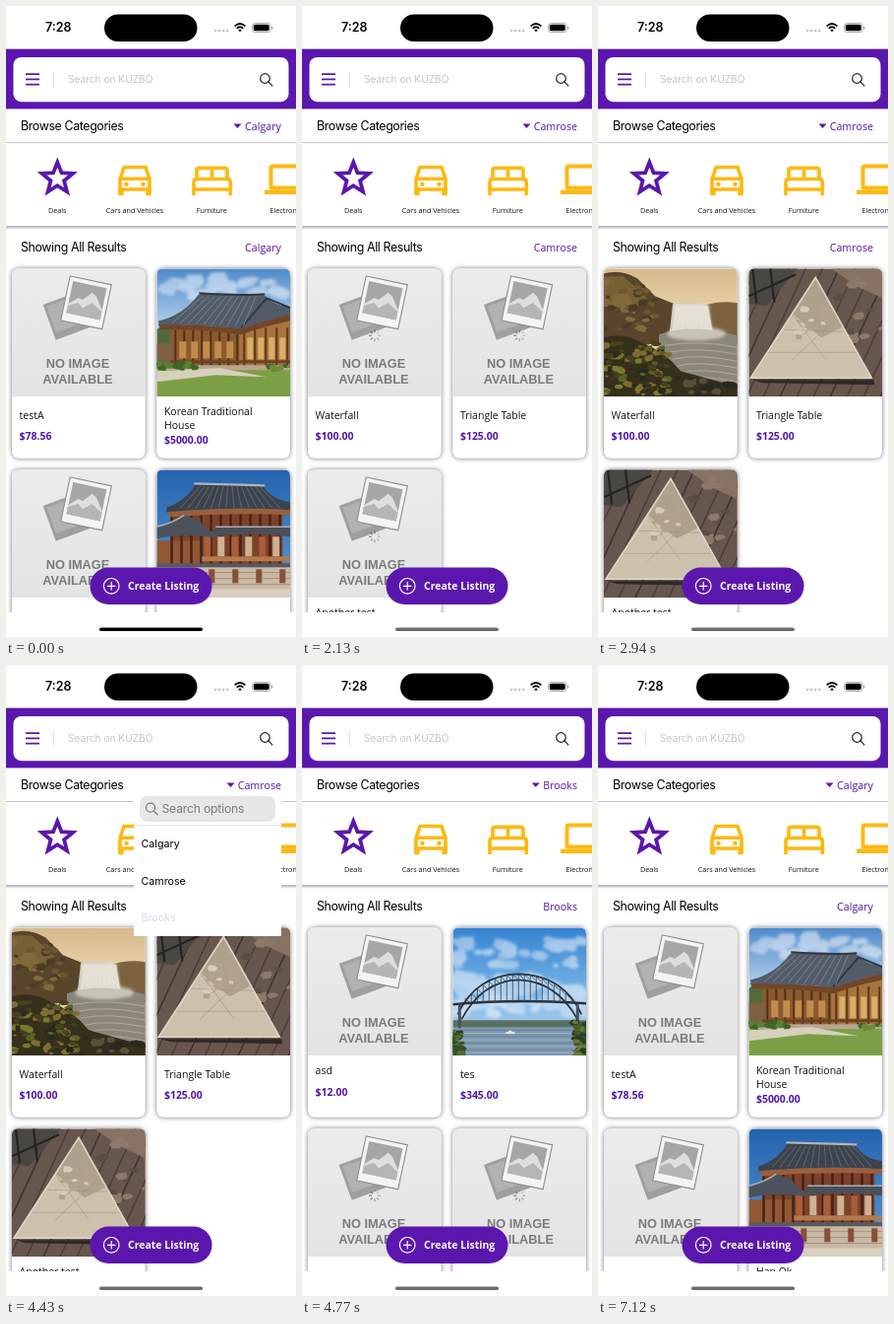
These frames come from a looping animation (295x640 px, 7.24 s). An HTML page:

```html
<!DOCTYPE html>
<html lang="en">
<head>
<meta charset="utf-8">
<title>Marketplace</title>
<style>
html, body { margin: 0; width: 100%; height: 100%; overflow: hidden; background: #fff; }
svg { display: block; }
text { font-family: "Open Sans", sans-serif; font-size: 10.5px; fill: #111; }
.ui { font-family: Inter, sans-serif; }
.head { font-size: 12.4px; letter-spacing: -.38px; fill: #000; }
.city { font-size: 10.7px; fill: #5216ac; text-anchor: end; }
.price { font-weight: 700; fill: #5216ac; }
.cat { font-size: 7.2px; text-anchor: middle; }
.opt { font-size: 10.7px; fill: #000; }
.none { font: bold 12.8px "Liberation Sans", sans-serif; fill: #7b7b7b; text-anchor: middle; }
.card { filter: drop-shadow(0 .5px 2.5px rgba(0,0,0,.55)); }
</style>
</head>
<body>
<script>
const LOOP = 7240, PURPLE = '#5b17ad', GOLD = '#fdb913';

const text = (x, y, s, cls = '', extra = '') => `<text x="${x}" y="${y}" class="${cls}" ${extra}>${s}</text>`;
const rect = (x, y, w, h, fill, r = 0, extra = '') =>
  `<rect x="${x}" y="${y}" width="${w}" height="${h}" rx="${r}" fill="${fill}" ${extra}/>`;
const shape = (d, fill, extra = '') => `<path d="${d}" fill="${fill}" ${extra}/>`;
const line = (d, color, w = 1, extra = '') =>
  `<path d="${d}" fill="none" stroke="${color}" stroke-width="${w}" ${extra}/>`;
const oval = (x, y, rx, ry, fill, extra = '') =>
  `<ellipse cx="${x}" cy="${y}" rx="${rx}" ry="${ry}" fill="${fill}" ${extra}/>`;
const fade = (id, ...stops) => `<linearGradient id="${id}" x2="0" y2="1">` +
  stops.map((c, i) => `<stop offset="${i / (stops.length - 1)}" stop-color="${c}"/>`).join('') + '</linearGradient>';
const repeat = (n, f) => Array.from({ length: n }, (_, i) => f(i)).join('');

function random(seed) {
  return () => (seed = (seed * 16807) % 2147483647) / 2147483647;
}

// Irregular stones, leaves or cloud puffs scattered over a box
function scatter(seed, n, x, y, w, h, size, colors) {
  const r = random(seed);
  return repeat(n, () => {
    const cx = x + r() * w, cy = y + r() * h, s = size * (.4 + r());
    const pts = Array.from({ length: 6 }, (_, k) => {
      const a = k * Math.PI / 3, d = s * (.65 + r() * .5);
      return (cx + Math.cos(a) * d).toFixed(1) + ',' + (cy + Math.sin(a) * d * .6).toFixed(1);
    });
    return `<polygon points="${pts.join(' ')}" fill="${colors[Math.floor(r() * colors.length)]}"/>`;
  });
}

const clouds = (seed, n, x, y, w, h, size) =>
  `<g opacity=".5" filter="url(#soft)">${scatter(seed, n, x, y, w, h, size, ['#fff', '#e6eff8'])}</g>`;

// Pictures, each 136 x 130
const art = {
  empty: rect(0, 0, 136, 130, 'url(#paper)') +
    `<g transform="translate(56 48) rotate(-20)">` + rect(-19, -19, 39, 38, '#9f9f9f') +
    rect(-16, -16, 33, 28, '#b2b2b2') + '</g>' +
    `<g transform="translate(75.5 34.5) rotate(12)">` +
    rect(-21.5, -23, 43, 46, '#f4f4f4', 0, 'stroke="#8f8f8f" stroke-width="1.1"') +
    rect(-17.5, -18.5, 35, 33, '#a6a6a6') +
    shape('M-17.5 5L-9 -3L-4 -2L4 -11L9 -8L17.5 4V14.5H-17.5Z', '#dedede') +
    shape('M-17.5 7L-8 2L-2 6L6 -1L17.5 6V14.5H-17.5Z', '#b5b5b5') + '</g>' +
    text(67, 101, 'NO IMAGE', 'none') + text(67, 117, 'AVAILABLE', 'none'),

  hall: rect(0, 0, 136, 130, 'url(#sky)') + clouds(5, 22, 10, 4, 120, 26, 11) +
    shape('M0 62Q8 54 16 62V98H0Z', '#526a3b') +
    shape('M14 58L84 60L136 46V100H14Z', '#8c5a2f') + shape('M84 60L136 50V99H84Z', '#a8743c') +
    shape('M0 76H18V98H0Z', '#7d6040') +
    repeat(8, i => rect(18 + i * 9, 62, 2, 38, '#553016')) +
    repeat(5, i => rect(88 + i * 11, 60, 2, 40, '#5e3618')) +
    repeat(5, i => rect(23 + i * 12, 74, 7, 17, '#c08d4d')) +
    repeat(4, i => rect(92 + i * 11, 70, 6, 22, '#d9ad6a')) +
    rect(14, 93, 122, 3, '#6b4322') +
    shape('M2 53Q26 48 42 27Q45 23 52 25L104 26Q110 26 114 31Q122 38 136 39V47Q108 53 86 61Q46 56 2 58Z', '#525c69') +
    shape('M2 57Q46 56 86 61Q108 53 136 47V53Q108 59 86 67Q46 61 4 62Z', '#70452a') +
    line('M43 25Q78 28 110 26M112 30L86 60M112 30L136 40', '#303842', 2) +
    repeat(10, i => line(`M${47 + i * 6} 28L${16 + i * 8} ${55 + i * .4}`, '#838e9a', .8)) +
    rect(0, 98, 136, 6, '#b7a78e') + rect(0, 103, 136, 27, '#7c9f46') +
    shape('M0 104L64 101L112 110L60 108L0 115Z', '#d6d0bd') +
    scatter(8, 22, 0, 96, 40, 5, 5, ['#3f6628', '#578236']) +
    scatter(9, 8, 116, 98, 20, 5, 5, ['#3f6628', '#6c8c3a']),

  gate: rect(0, 0, 136, 130, 'url(#deep)') +
    shape('M14 42H128V102H14Z', '#7d4129') + shape('M0 72H44V104H0Z', '#935734') +
    repeat(12, i => rect(14 + i * 10, 42, 2.5, 58, '#45231a')) +
    repeat(6, i => rect(48 + i * 14, 68, 7, 20, i % 2 ? '#cdb292' : '#a95d3a')) +
    shape('M10 38Q30 32 40 14L108 16Q116 30 136 33V41Q74 37 10 44Z', '#3c434d') +
    shape('M10 43Q74 37 136 41V46Q74 43 14 48Z', '#9a5f3c') +
    line('M38 14L110 16', '#b0b6bb', 2.2) +
    repeat(14, i => line(`M${44 + i * 4.7} 17L${24 + i * 7.8} 39`, '#69727c', .8)) +
    shape('M0 58Q16 54 28 46L44 52Q50 62 60 64V69Q28 64 0 70Z', '#4b525c') +
    shape('M60 58H136V68Q96 63 56 68Z', '#4a4f58') +
    line('M0 58Q16 54 28 46M60 58H136', '#a7aeb3', 1.6) +
    rect(46, 88, 90, 5, '#b47a4e') +
    rect(0, 98, 136, 24, '#c9b9a4') + rect(0, 95, 136, 4, '#575b60') +
    repeat(3, i => rect(0, 104 + i * 6, 136, .8, '#978674')) +
    repeat(6, i => rect(5 + i * 24, 101, 6, 14, '#83513a')) +
    rect(0, 121, 136, 9, '#d8cfc1'),

  falls: rect(0, 0, 136, 130, 'url(#dusk)') +
    shape('M0 5Q18 0 34 10L52 28L72 36V72L40 78L0 98Z', '#59452c') +
    shape('M0 8L20 8L44 30L30 42L0 38Z', '#766035') +
    scatter(14, 35, 0, 14, 58, 56, 6, ['#4b3b25', '#6d5731', '#806a3c']) +
    shape('M100 38Q118 32 136 35V76H98Z', '#7e6240') +
    shape('M70 36Q86 31 106 38L112 72H66Z', '#cfc7b9') +
    `<g filter="url(#soft)">` +
    repeat(9, i => line(`M${73 + i * 4} 36Q${74 + i * 4} 50 ${70 + i * 5} 68`, '#f6f3ec', 2.4)) + '</g>' +
    shape('M56 67Q90 55 136 68V130H56Z', '#8a8679') +
    oval(94, 66, 30, 7, '#e2ddd1', 'opacity=".7" filter="url(#soft)"') +
    repeat(7, i => line(`M${62 + i * 4} ${78 + i * 7}Q96 ${72 + i * 7} 136 ${80 + i * 7}`, '#b5aa92', 1)) +
    shape('M0 70Q20 64 40 76Q62 84 78 104L136 120V130H0Z', '#352f1c') +
    scatter(31, 110, 0, 76, 66, 52, 4.5, ['#596026', '#787a2d', '#27291a', '#46401f', '#806a32']) +
    scatter(15, 16, 70, 111, 62, 18, 6, ['#2b2820', '#58503d']),

  table: rect(0, 0, 136, 130, '#67564d') +
    repeat(15, i => line(`M${-70 + i * 17} 130L${-10 + i * 17} 0`, i % 3 ? '#4b3d38' : '#3b302d', 1.5)) +
    shape('M0 0H50L18 38L0 36Z', '#4a4742') + line('M0 28L48 6M22 0L26 34M4 0L8 35', '#242321', 2.2) +
    shape('M84 0H136V30L110 18Z', '#887264') + scatter(6, 14, 92, 8, 44, 70, 7, ['#8d796b', '#594b45']) +
    shape('M4 113L127 113L128 118L14 116Z', '#2f2826') +
    shape('M68 9L125 111H2Z', '#cdc0ac') +
    shape('M68 9L96 59L74 70L54 54L45 46Z', '#b0a18e') +
    scatter(22, 13, 51, 37, 29, 36, 5, ['#d8ccb8', '#b3a38e']) +
    line('M45 47L78 92M90 49L44 93M36 62L99 64M20 85H111', '#a39480', .6) +
    line('M68 9L125 111H2Z', '#e0d6c5', 1.6),

  bridge: rect(0, 0, 136, 130, 'url(#noon)') + clouds(44, 30, 0, 12, 136, 28, 10) +
    clouds(21, 45, 0, 52, 136, 38, 14) +
    rect(0, 94, 136, 8, '#58705f') + rect(0, 101, 136, 29, '#7f98ae') +
    repeat(8, i => line(`M${i % 2 * 8} ${104 + i * 3.3}H136`, i % 2 ? '#9fb4c5' : '#68829a', .9)) +
    line('M0 78Q66 72 136 77', '#28323d', 2.5) +
    line('M5 88Q24 48 67 47Q112 48 131 88M9 93Q30 54 67 53Q105 54 127 93', '#28323d', 1.7) +
    repeat(19, i => {
      const x = 13 + i * 6, top = 47 + Math.pow((x - 67) / 62, 2) * 33;
      return line(`M${x} ${top}V76M${x} ${top}l5 5`, '#35414d', .8);
    }) +
    line('M7 78V102M127 78V102', '#4a5158', 3) +
    rect(54, 106, 9, 1.6, '#f2f4f5') + rect(57, 104.5, 3, 1.6, '#fff') +
    scatter(12, 36, -3, 104, 13, 26, 5, ['#36502b', '#506d32', '#273d24']) +
    scatter(19, 44, 124, 96, 14, 34, 5, ['#435c2a', '#6a7a34', '#293d24']),

  creek: rect(0, 0, 136, 130, '#7d6a52') +
    scatter(77, 170, 0, 0, 136, 86, 7, ['#8d7a5e', '#6a5a45', '#a08b6c', '#524636', '#7a6a45', '#8a8171']) +
    scatter(41, 90, 8, 4, 124, 62, 2.6, ['#d8d2c5', '#aaa292', '#4b4235', '#efebe2']) +
    shape('M0 76Q22 80 32 98Q50 108 74 100Q104 92 136 100V130H0Z', '#b09a7f') +
    shape('M0 112Q32 102 54 120L60 130H0Z', '#c9bba8') +
    shape('M70 66Q96 56 122 72L116 90L84 94Z', '#a0875f') +
    scatter(63, 60, 0, 92, 136, 38, 5, ['#bda88c', '#a28b70', '#9a8f80', '#c9bca8']) +
    line('M0 76Q22 80 32 98Q50 108 74 100Q104 92 136 100M70 66L84 94L116 90', '#463828', 1.6)
};

// title lines, price, picture, time it loads, text shift
const cities = {
  Calgary: [
    [['testA'], '$78.56'],
    [['Korean Traditional', 'House'], '$5000.00', 'hall', 0],
    [['new'], '$50.00'],
    [['Han Ok'], '$900.00', 'gate', 0]
  ],
  Camrose: [
    [['Waterfall'], '$100.00', 'falls', 2240],
    [['Triangle Table'], '$125.00', 'table', 2940],
    [['Another test'], '$20.00', 'table', 2940, -4]
  ],
  Brooks: [
    [['asd'], '$12.00', '', 0, -3.5],
    [['tes'], '$345.00', 'bridge', 4770],
    [['rocks'], '$10.00', 'creek', 6210],
    [['Puddle'], '$15.00', 'creek', 6210]
  ]
};

const use = id => `<use href="#${id}"/>`;

function card([title, price, pic, loads, shift = 0], i) {
  const x = i % 2 ? 153.3 : 6, y = i > 1 ? 470.3 : 266.3, two = title.length > 1;
  const spinner = `<g transform="translate(68 68)"><g class="spin">` +
    repeat(8, k => line('M0 -3V-6', '#777', 1.4, `transform="rotate(${k * 45})" opacity="${.25 + k * .09}"`)) + '</g></g>';
  return `<g transform="translate(${x} ${y})"><g class="card">${rect(0, 0, 135.7, 192.5, '#fff', 7)}</g>
    <g clip-path="url(#top)">${pic
      ? `<g class="wait" data-at="${loads}">${use('empty')}${spinner}</g><g class="pic" data-at="${loads}">${use(pic)}</g>`
      : use('empty')}</g>
    <g class="info" transform="translate(0 ${shift})">` +
    title.map((s, k) => text(7.6, (two ? 149 : 152.5) + k * 14, s)).join('') +
    text(7.6, two ? 177.5 : 174, price, 'price') + '</g></g>';
}

const arrowX = { Calgary: 231.5, Camrose: 224.5, Brooks: 233.8 };
const page = name => `<g class="page" data-city="${name}">
  ${text(280, 125.5, name, 'city')}${text(280, 249, name, 'city')}
  ${shape(`M${arrowX[name]} 119.5h8l-4 4.5z`, PURPLE)}
  <g clip-path="url(#list)">${cities[name].map(card).join('')}</g></g>`;

const lens = (x, y, r, color) => `<circle cx="${x}" cy="${y}" r="${r}" fill="none" stroke="${color}" stroke-width="1.2"/>` +
  line(`M${x + r * .7} ${y + r * .7}l4 4`, color, 1.3, 'stroke-linecap="round"');

const star = Array.from({ length: 10 }, (_, i) => {
  const a = i * Math.PI / 5, r = i % 2 ? 7.2 : 16.5;
  return (52.3 + r * Math.sin(a)).toFixed(1) + ',' + (175 - r * Math.cos(a)).toFixed(1);
}).join(' ');

const status = text(40, 26.3, '7:28', 'ui', 'style="font-size:12.5px;font-weight:600;fill:#000"') +
  rect(100, 8.5, 94.5, 27.5, '#000', 13.75) +
  repeat(4, i => oval(213 + i * 4.1, 25, 1.3, 1.3, '#c4c4c4')) +
  line('M232.6 20.4Q238 15.6 243.4 20.4M234.7 22.7Q238 19.8 241.3 22.7', '#000', 1.8) +
  shape('M236.2 24.3Q238 23 239.8 24.3L238 26.3Z', '#000') +
  rect(250.5, 17.5, 18.5, 9, 'none', 2.8, 'stroke="#999" stroke-width=".8"') +
  rect(251.8, 18.8, 15.9, 6.4, '#000', 1.7) + rect(270, 20.5, 1.3, 3, '#999', .6);

const header = rect(0, 43.6, 295, 60.8, PURPLE) + rect(7.5, 52, 280, 45.2, '#fff', 8) +
  line('M20 69.2H34M20 74.4H34M20 79.6H34', PURPLE, 1.7) + rect(48, 67, 1, 15, '#e2e2e2') +
  text(63, 78, 'Search on KUZBO', 'ui', 'style="font-size:10.15px;fill:#c6c6ca"') + lens(263.5, 73.5, 4.8, '#222') +
  text(15, 126, 'Browse Categories', 'ui head') + text(15, 249, 'Showing All Results', 'ui head') +
  rect(0, 138, 295, 1, '#c8c8c8');

const categories = rect(0, 223, 295, 4, 'url(#shade)') +
  `<polygon points="${star}" fill="none" stroke="${PURPLE}" stroke-width="3.8"/>` +
  line('M116 190V175.5L120 163.5H142L146 175.5V190M116 175.2H146M116 186H146', GOLD, 3.6, 'stroke-linejoin="round"') +
  rect(114.2, 184.5, 5.6, 7.8, GOLD, 1.5) + rect(142.2, 184.5, 5.6, 7.8, GOLD, 1.5) +
  oval(122.5, 180.7, 2.3, 2.3, GOLD) + oval(139.5, 180.7, 2.3, 2.3, GOLD) +
  line('M194 176V167Q194 164.3 196.5 164.3H222.5Q225 164.3 225 167V176M209.5 164V175M191 192V179Q191 175.5 194 175.5H225Q228.3 175.5 228.3 179V192M191 186H228', GOLD, 3.7) +
  rect(269.5, 162.5, 44, 22, 'none', 2, `stroke="${GOLD}" stroke-width="4"`) + rect(263, 186.5, 50, 4.5, GOLD, 1) +
  [['Deals', 52.3], ['Cars and Vehicles', 131], ['Furniture', 209.3], ['Electronics', 286.5]]
    .map(([s, x]) => text(x, 210.4, s, 'cat')).join('');

const button = rect(85.5, 569.5, 124, 37.5, PURPLE, 18.75) +
  `<circle cx="107.2" cy="588.3" r="7.8" fill="none" stroke="#fff" stroke-width="1.2"/>` +
  line('M103 588.3h8.4M107.2 584.1v8.4', '#fff', 1.2) +
  text(124, 592, 'Create Listing', '', 'style="font-weight:700;fill:#fff"');

const menu = `<g id="menu">${rect(130, 129.5, 150, 145.5, '#fff')}${rect(136, 133, 138, 26, '#e7e7e9', 8)}
  ${rect(130, 162, 150, .8, '#e6e6e6')}${lens(147, 144.7, 4.5, '#77777c')}
  ${text(158.5, 150.4, 'Search options', 'ui', 'style="font-size:12.2px;letter-spacing:-.2px;fill:#7c7c81"')}
  ${Object.keys(cities).map((s, i) => text(137.5, 185 + i * 37.6, s, 'ui opt')).join('')}</g>`;

document.body.innerHTML = `<svg width="295" height="640" viewBox="0 0 295 640"><defs>
  ${fade('paper', '#ebebeb', '#e4e4e4')}${fade('sky', '#4f8acb', '#bdd6ec', '#d7e5ee')}
  ${fade('deep', '#2464ae', '#5f9ad6')}${fade('dusk', '#d7b98c', '#f0dcb4', '#c0a880')}
  ${fade('noon', '#3483d2', '#78b3e6', '#c8dded')}${fade('shade', '#a9a9a9', '#fff')}
  <filter id="soft"><feGaussianBlur stdDeviation="1.6"/></filter>
  <clipPath id="top"><path d="M0 130V7Q0 0 7 0H128.7Q135.7 0 135.7 7V130Z"/></clipPath>
  <clipPath id="list"><path d="M0 258H295V615H0Z"/></clipPath>
  ${Object.entries(art).map(([id, s]) => `<g id="${id}">${s}</g>`).join('')}</defs>
  ${rect(0, 0, 295, 640, '#fff')}${status}${header}${categories}
  ${Object.keys(cities).map(page).join('')}${button}${menu}
  ${rect(95, 630.5, 105, 3.4, '#000', 1.7, 'id="home"')}</svg>`;

// start, city, menu open, pressed option
const steps = [
  [0, 'Calgary'], [1260, 'Calgary', true], [2000, 'Calgary', true, 'Camrose'],
  [2120, 'Camrose'], [3620, 'Camrose', true], [4430, 'Camrose', true, 'Brooks'],
  [4620, 'Brooks'], [6210, 'Brooks', true], [6910, 'Brooks', true, 'Calgary'],
  [7120, 'Calgary']
];

const all = q => [...document.querySelectorAll(q)];
const show = (el, on) => { el.style.display = on ? '' : 'none'; };
const pages = all('.page'), pics = all('.pic'), waits = all('.wait'), spins = all('.spin'), options = all('.opt');
const menuBox = document.getElementById('menu'), home = document.getElementById('home');
const lastInfo = all('[data-city="Calgary"] .info')[3];

function draw(t) {
  const [, city, open, pressed] = steps.filter(s => s[0] <= t).pop();
  pages.forEach(p => show(p, p.dataset.city === city));
  pics.forEach(p => show(p, t >= +p.dataset.at));
  waits.forEach(p => show(p, t < +p.dataset.at));
  show(menuBox, open);
  options.forEach(o => { o.style.fill = o.textContent === pressed ? '#dcd6ec' : ''; });
  home.setAttribute('fill', t < 1260 ? '#000' : '#6b6b6b');
  lastInfo.setAttribute('transform', `translate(0 ${t < 7120 ? 0 : -4})`);
  const turn = t < 2940 ? Math.floor((t - 2000) / 120) * 45 : 0;
  spins.forEach(s => s.setAttribute('transform', `rotate(${turn})`));
}

const start = performance.now();
function tick() {
  draw((performance.now() - start) % LOOP);
  requestAnimationFrame(tick);
}
tick();
</script>
</body>
</html>
```
